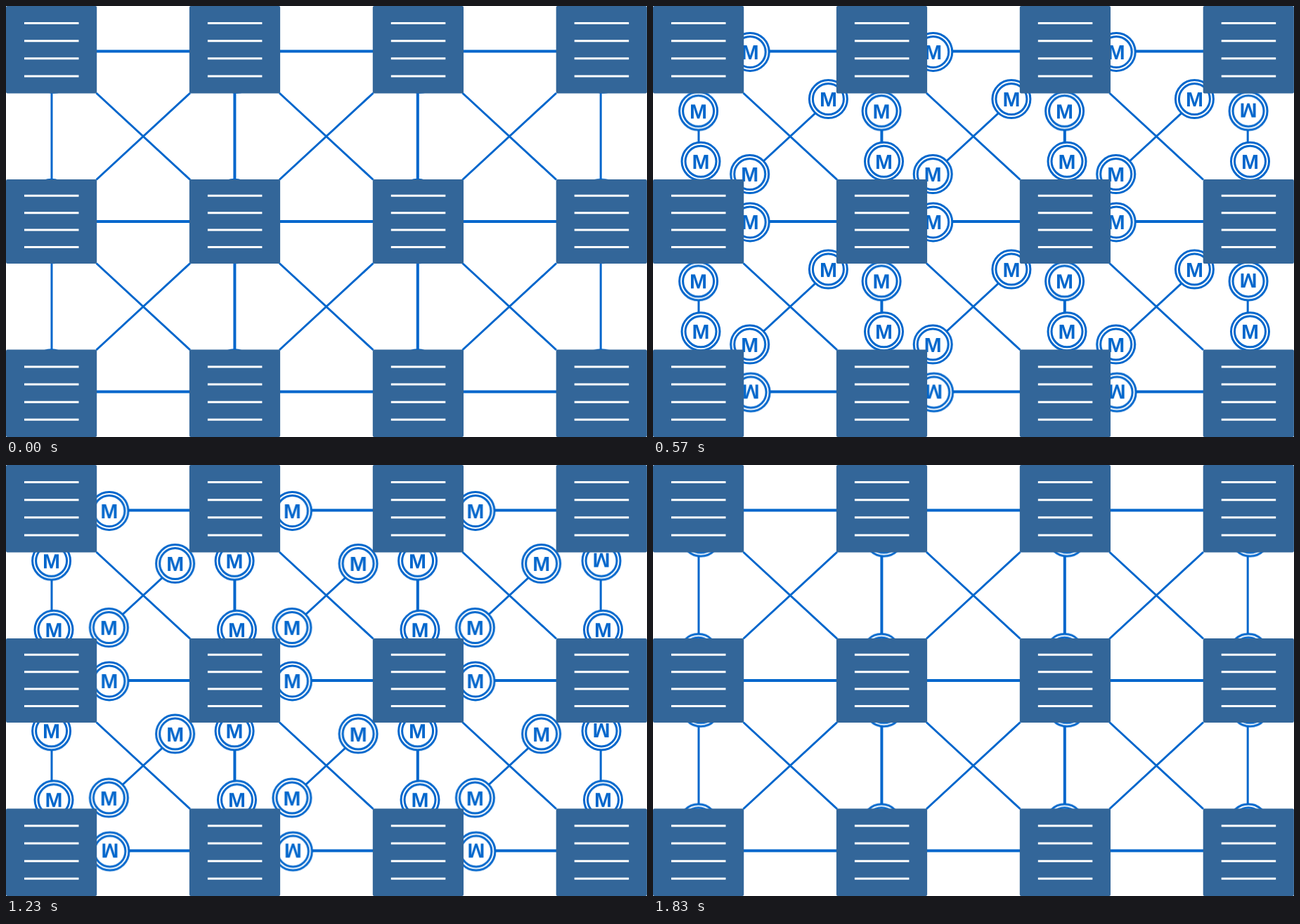
Animation, 912 px wide and 614 px high, one loop 1.86 s. Source, as an HTML page:

```html
<!DOCTYPE html>
<html lang="en">
<head>
<meta charset="utf-8">
<title>Mesh of nodes</title>
<style>
  html, body { margin: 0; width: 100%; height: 100%; overflow: hidden; background: #fff; }
  svg { display: block; width: 912px; height: 614px; }
  .links { stroke: #06c; stroke-width: 3; fill: none; }
  .ring { fill: #fff; stroke: #06c; stroke-width: 3; }
  .letter { fill: #06c; font: bold 30px "Liberation Sans", Arial, sans-serif; text-anchor: middle; }
  .node rect { fill: #369; }
  .node path { stroke: #fff; stroke-width: 3; }
  /* out and back, 31 steps of 30 ms each way */
  .coins { animation: shuttle 1860ms steps(31) infinite; }
  @keyframes shuttle {
    0%, 100% { transform: translate(0px, 0px); }
    50% { transform: translate(var(--dx), var(--dy)); }
  }
</style>
</head>
<body>
<svg id="stage" viewBox="0 0 912 614">
  <defs>
    <g id="coin">
      <circle class="ring" r="27"/>
      <circle class="ring" r="22"/>
      <text class="letter" y="10.5">M</text>
    </g>
  </defs>
</svg>
<script>
  const stage = document.getElementById("stage");
  const PITCH_X = 260.5, PITCH_Y = 242.5;

  function add(parent, tag, attrs) {
    const el = document.createElementNS("http://www.w3.org/2000/svg", tag);
    for (const key in attrs) el.setAttribute(key, attrs[key]);
    return parent.appendChild(el);
  }

  function grid(cols, rows, draw) {
    for (let r = 0; r < rows; r++)
      for (let c = 0; c < cols; c++) draw(c, r);
  }

  function drawLinks() {
    const links = add(stage, "g", { class: "links" });
    for (let r = 0; r < 3; r++)
      add(links, "path", { d: `M60 ${64.4 + r * PITCH_Y}H850`, "stroke-width": 4, style: "stroke-width:4" });
    for (let c = 0; c < 4; c++)
      add(links, "path", { d: `M${65 + c * 260.4} 60V550`, style: `stroke-width:${c % 3 ? 4 : 3}` });
    grid(3, 2, (c, r) => {
      const x = 128.5 + c * PITCH_X, y = 124 + r * PITCH_Y;
      add(links, "path", { d: `M${x} ${y}l133.5 123.5m0 -123.5l-133.5 123.5` });
    });
  }

  // One flock of coins sharing a start point and a travel vector.
  function drawCoins({ x, y, dx, dy, cols, rows, flipped = () => false }) {
    const flock = add(stage, "g", { class: "coins", style: `--dx:${dx}px;--dy:${dy}px` });
    grid(cols, rows, (c, r) => {
      const flip = flipped(c, r);
      const px = x + c * PITCH_X + (flip ? 1 : 0), py = y + r * PITCH_Y;
      add(flock, "use", { href: "#coin", transform: `translate(${px} ${py})${flip ? " rotate(180)" : ""}` });
    });
  }

  function drawNodes() {
    const tops = [0, 247, 489.5], heights = [124.5, 120, 124.5];
    const firstLines = [24.6, 270.3, 514], gaps = [25.1, 24.4, 25.1];
    grid(4, 3, (c, r) => {
      const x = c * 260.9;
      const node = add(stage, "g", { class: "node" });
      add(node, "rect", { x, y: tops[r], width: 129.2, height: heights[r], rx: 2 });
      for (let i = 0; i < 4; i++)
        add(node, "path", { d: `M${x + 26} ${firstLines[r] + i * gaps[r]}h77.5` });
    });
  }

  drawLinks();
  drawCoins({ x: 68, y: 96.3, dx: 0, dy: 204, cols: 4, rows: 2 });
  drawCoins({ x: 64.6, y: 274.3, dx: 0, dy: -203.4, cols: 4, rows: 2, flipped: c => c === 3 });
  drawCoins({ x: 332.4, y: 57.6, dx: -135.5, dy: 122.4, cols: 3, rows: 2 });
  drawCoins({ x: 54.8, y: 314.6, dx: 135.2, dy: -122.4, cols: 3, rows: 2 });
  drawCoins({ x: 55.3, y: 65.4, dx: 135.2, dy: 0, cols: 3, rows: 3, flipped: (c, r) => r === 2 });
  drawNodes();
</script>
</body>
</html>
```
